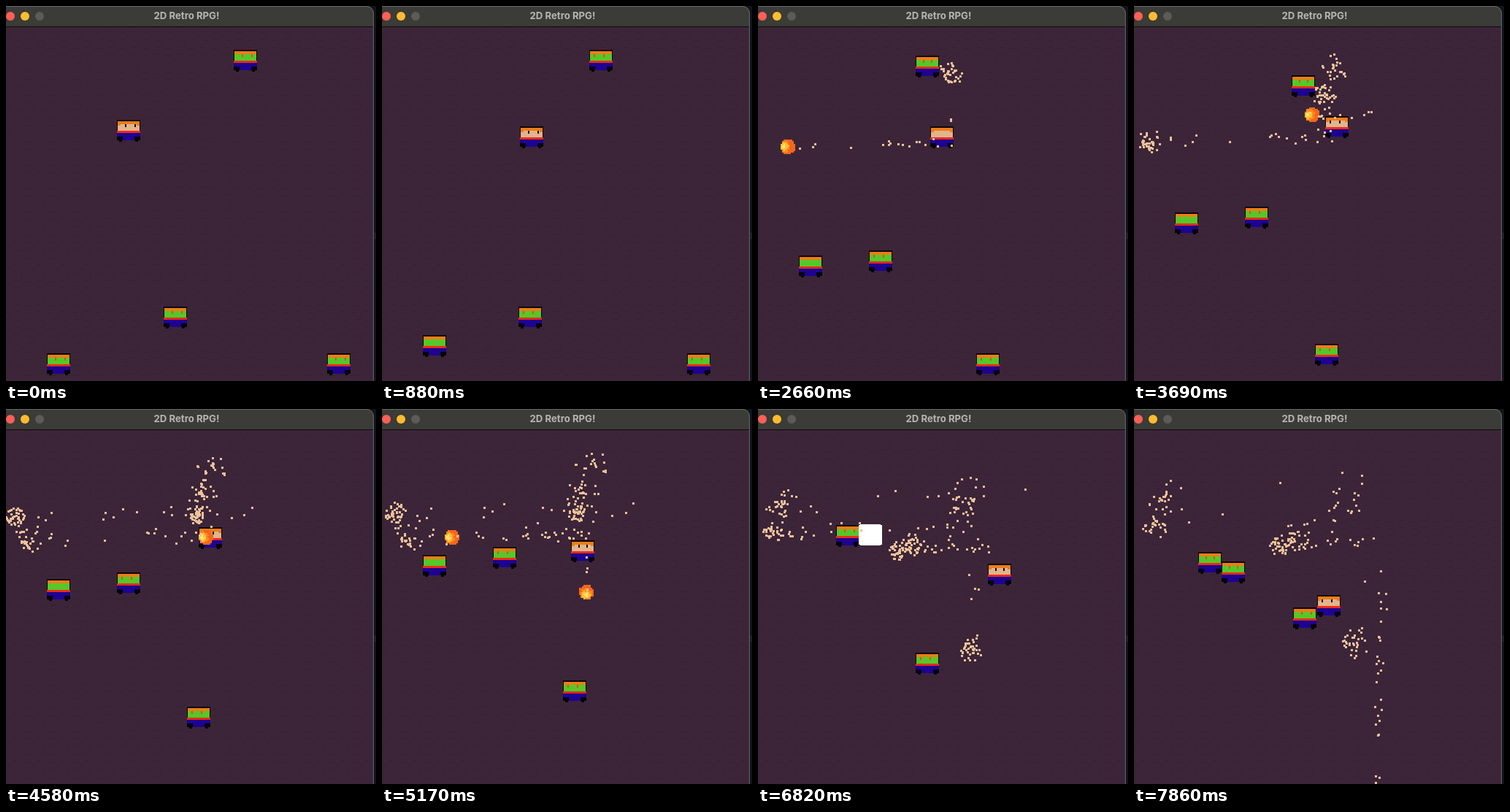
Write an HTML page that moves like this. It is 507 px wide and 514 px high and loops after 8000 ms.

```html
<!DOCTYPE html>
<html lang="en">
<head>
<meta charset="utf-8">
<title>2D Retro RPG!</title>
<style>
html, body { margin: 0; width: 100%; height: 100%; overflow: hidden; background: #10151a; }
svg { display: block; width: 507px; height: 514px; }
</style>
</head>
<body>
<svg viewBox="0 0 507 514" xmlns="http://www.w3.org/2000/svg">
  <defs>
    <clipPath id="win"><path d="M0 0H494a10 10 0 0 1 10 10V514H0z"/></clipPath>
    <clipPath id="room"><path d="M0 29H503V514H0z"/></clipPath>
    <pattern id="floor" x="24" y="28" width="32" height="32" patternUnits="userSpaceOnUse">
      <rect width="32" height="32" fill="#3c2539"/>
      <path d="M2 8.500h9M17 6.500h10M6 17.500h8M22 19.500h8M0 30.500h12M18 28.500h9M14.500 10v5M28.500 22v5" stroke="#372134" fill="none"/>
    </pattern>
  </defs>
  <path d="M504.500 312h3M505 315h2M504.500 318h3" stroke="#3b4045"/>
  <g clip-path="url(#win)">
    <rect width="504" height="514" fill="url(#floor)"/>
    <rect width="504" height="28" fill="#3b3b37"/>
    <rect y="28" width="504" height="1" fill="#0c090c"/>
    <circle cx="6" cy="14" r="6" fill="#ff5f57"/>
    <circle cx="26" cy="14" r="6" fill="#febc2e"/>
    <circle cx="46" cy="14" r="6" fill="#5b5b58"/>
    <text x="247.500" y="18" text-anchor="middle" font-family="Inter, sans-serif" font-weight="700" font-size="13.200" fill="#b7b6b4">2D Retro RPG!</text>
  </g>
  <path d="M0 .5H494a9.500 9.500 0 0 1 9.500 9.500V514" fill="none" stroke="#6a686a"/>
  <g id="stage" clip-path="url(#room)" shape-rendering="crispEdges"></g>
</svg>
<script>
const LOOP = 8000, FIRST = 300, TICK = 147.4, STEP = 148, DT = 4;
const SPEED = 0.3, TRAIL = 36, BURST = 40;
const PUSH = 24, PUSH_MS = 120, FLASH = 220;
const dirs = { l: [-1, 0], r: [1, 0], u: [0, -1], d: [0, 1] };
const stage = document.getElementById('stage');

let seed = 7;
const rand = () => (seed = (seed * 16807) % 2147483647) / 2147483647;
const spread = r => (rand() * 2 - 1) * r;

// Hero key points: time, x, y
const heroPath = [
  [0, 152, 156], [300, 152, 156], [1330, 238, 178], [2000, 236, 178], [2660, 236, 165],
  [2800, 238, 162], [3450, 305, 134], [3850, 238, 160], [4580, 264, 161], [5000, 264, 180],
  [5770, 244, 180], [6350, 300, 179], [6812, 315, 212], [7300, 319, 255], [7848, 251, 255]
];
const shots = [
  [1337, 'u'], [1968, 'l'], [2800, 'u'], [3450, 'l'], [3850, 'u'],
  [4575, 'l'], [5000, 'd'], [5450, 'l'], [6350, 'l'], [6830, 'd']
].map(([start, face]) => ({ start, face, dir: dirs[face] }));

const foe = (x, y, start, pace, ...route) =>
  ({ x, y, start, pace, route, face: 'r', lives: 3, hitAt: -1e4 });
const foes = [
  foe(312, 60, 240, 0.055, [216, 60], [216, 400]),
  foe(56, 476, 300, 0.0565, [56, 159], [108, 159], [88, 159], [88, 400]),
  foe(440, 476, 400, 0.062, [248, 476], [248, 345], [216, 345], [216, 300], [218, 300], [218, 100]),
  foe(216, 412, 240, 0.058, [152, 412], [152, 169], [165, 169], [165, 158], [120, 158], [120, 400])
];
const hero = { face: 'r' };
const sparks = [];

function spark(born, x, y, r) {
  const a = rand() * Math.PI * 2, d = Math.sqrt(rand()) * r;
  sparks.push({
    born, x: x + Math.cos(a) * d, y: y + Math.sin(a) * d,
    vx: 0.009 + spread(0.005), vy: -0.008 + spread(0.005),
    life: 600 + rand() * 4600
  });
}

function moveHero(t) {
  const i = Math.max(1, heroPath.findIndex(k => k[0] > t));
  const [t0, x0, y0] = heroPath[i - 1], [t1, x1, y1] = heroPath[i];
  const k = (t - t0) / (t1 - t0), dx = x1 - x0, dy = y1 - y0;
  hero.x = x0 + dx * k;
  hero.y = y0 + dy * k;
  const aim = shots.find(s => t >= s.start && t < s.start + 250);
  if (aim) hero.face = aim.face;
  else if (dx || dy) hero.face = Math.abs(dx) >= Math.abs(dy) ? (dx < 0 ? 'l' : 'r') : (dy < 0 ? 'u' : 'd');
}

// Walk along the route, x before y; a hit pushes back for a moment
function moveFoe(f, t) {
  if (t < f.start || !f.lives) return;
  if (t < f.hitAt + PUSH_MS) {
    f.x += f.push[0] * PUSH * DT / PUSH_MS;
    f.y += f.push[1] * PUSH * DT / PUSH_MS;
    return;
  }
  const dx = f.route[0][0] - f.x, dy = f.route[0][1] - f.y, step = f.pace * DT;
  const go = d => Math.max(-step, Math.min(step, d));
  if (Math.abs(dx) > 0.01) {
    f.x += go(dx);
    f.face = dx < 0 ? 'l' : 'r';
    f.sideways = true;
  } else if (Math.abs(dy) > 0.01) {
    f.y += go(dy);
    if (dy > 0) { f.face = 'd'; f.sideways = false; }
    else if (!f.sideways) f.face = 'u';
  } else if (f.route.length > 1) f.route.shift();
}

function moveShot(s, t) {
  if (s.done || t < s.start) return;
  const [ux, uy] = s.dir;
  if (!s.live) Object.assign(s, { live: true, x: hero.x + 16, y: hero.y + 15 });
  s.x += ux * SPEED * DT;
  s.y += uy * SPEED * DT;
  if (rand() < DT / TRAIL) spark(t, s.x - ux * 8, s.y - uy * 8, 6);

  const target = foes.find(f => {
    const dx = Math.abs(f.x + 16 - s.x), dy = Math.abs(f.y + 15 - s.y);
    return f.lives && dx < (ux ? 28 : 24) && dy < (uy ? 28 : 24);
  });
  if (target) {
    target.lives--;
    target.hitAt = t;
    target.push = s.dir;
  }
  if (target || s.x < 12) for (let i = 0; i < BURST; i++) spark(t, s.x, s.y, 13);
  s.done = target || s.x < 12 || s.y > 530;
}

function snapshot(t) {
  const dust = sparks.filter(s => t - s.born < s.life).map(s => {
    const age = t - s.born;
    return `M${Math.round(s.x + s.vx * age) - 1} ${Math.round(s.y + s.vy * age) - 1}h3v3h-3z`;
  });
  return {
    actors: [...foes, hero].map(a => ({
      x: a.x, y: a.y, face: a.face, alive: a.lives !== 0, hit: t < a.hitAt + FLASH
    })),
    balls: shots.map(s => ({ x: s.x || 0, y: s.y || 0, on: s.live && !s.done })),
    dust: dust.join('')
  };
}

// Play the game once; the picture advances in even ticks after an opening pause
const scenes = [];
for (let t = 0; t < LOOP; t += DT) {
  moveHero(Math.min(t, 7844));
  foes.forEach(f => moveFoe(f, t));
  shots.forEach(s => moveShot(s, t));
  if (t === 0 || (t >= FIRST && (t - FIRST) % STEP === 0)) scenes.push(snapshot(t));
}

function add(parent, tag, attrs) {
  const el = document.createElementNS('http://www.w3.org/2000/svg', tag);
  for (const k in attrs) el.setAttribute(k, attrs[k]);
  parent.appendChild(el);
  return el;
}
const box = (g, x, y, width, height, fill) => add(g, 'rect', { x, y, width, height, fill });

function buildActor(isHero) {
  const el = add(stage, 'g', {}), body = add(el, 'g', {});
  box(body, 0, 0, 32, 16, '#0b080b');
  box(body, 1, 2, 30, 4, '#ed7d18');
  box(body, 1, 6, 30, 9, isHero ? '#e2b48d' : '#55c829');
  if (isHero) for (const x of [1, 27]) box(body, x, 5, 4, 3, '#ed7d18');
  box(body, 0, 15, 32, 3, '#f02a17');
  box(body, 0, 18, 32, 10, '#1e0292');
  for (const x of [0, 24]) box(body, x, 23, 8, 5, '#050307');
  for (const x of [3, 25]) box(body, x, 28, 4, 2, '#050307');
  const eyes = [0, 1].map(() => box(body, 0, 6, 2, 4, isHero ? '#140c0c' : '#df4f1c'));
  const flash = add(el, 'path', { d: 'M2 0H30V1H32V28H30V29H2V28H0V1H2z', fill: '#fff' });
  return { el, body, eyes, flash };
}

// Pixel disc whose hot core leans towards (cx, cy)
function buildBall(cx, cy) {
  const g = add(stage, 'g', {});
  for (let y = -5; y < 5; y++) for (let x = -5; x < 5; x++) {
    const px = x + 0.5, py = y + 0.5;
    if (Math.hypot(px, py) + rand() * 0.5 > 5.3) continue;
    const heat = Math.hypot(px - cx, py - cy) + spread(0.5);
    const fill = heat < 1.5 ? '#ffe27a' : heat < 2.7 ? '#ffc038' : heat < 4.2 ? '#ff8a1e' : '#f4661c';
    box(g, x * 2, y * 2, 2, 2, fill);
  }
  return g;
}

const actors = [...foes, hero].map(a => buildActor(a === hero));
const balls = shots.map(s => buildBall(s.dir[0] * 2.6, Math.max(0, s.dir[1]) * 2));
const dust = add(stage, 'path', { fill: '#ecc199' });

const show = (el, on) => el.setAttribute('display', on ? 'inline' : 'none');
const move = (el, p) => el.setAttribute('transform', `translate(${Math.round(p.x)} ${Math.round(p.y)})`);
const eyeX = { r: [11, 24], l: [6, 19], d: [10, 21], u: [0, 0] };

function render(ms) {
  const tick = ms < FIRST ? 0 : 1 + Math.floor((ms - FIRST) / TICK);
  const scene = scenes[Math.min(tick, scenes.length - 1)];
  scene.actors.forEach((p, i) => {
    const { el, body, eyes, flash } = actors[i];
    move(el, p);
    show(el, p.alive);
    show(body, !p.hit);
    show(flash, p.hit);
    eyes.forEach((eye, n) => {
      show(eye, p.face !== 'u');
      eye.setAttribute('x', eyeX[p.face][n]);
    });
  });
  scene.balls.forEach((p, i) => {
    show(balls[i], p.on);
    move(balls[i], p);
  });
  dust.setAttribute('d', scene.dust);
}

const start = performance.now();
function frame() {
  render((performance.now() - start) % LOOP);
  requestAnimationFrame(frame);
}
frame();
</script>
</body>
</html>
```
